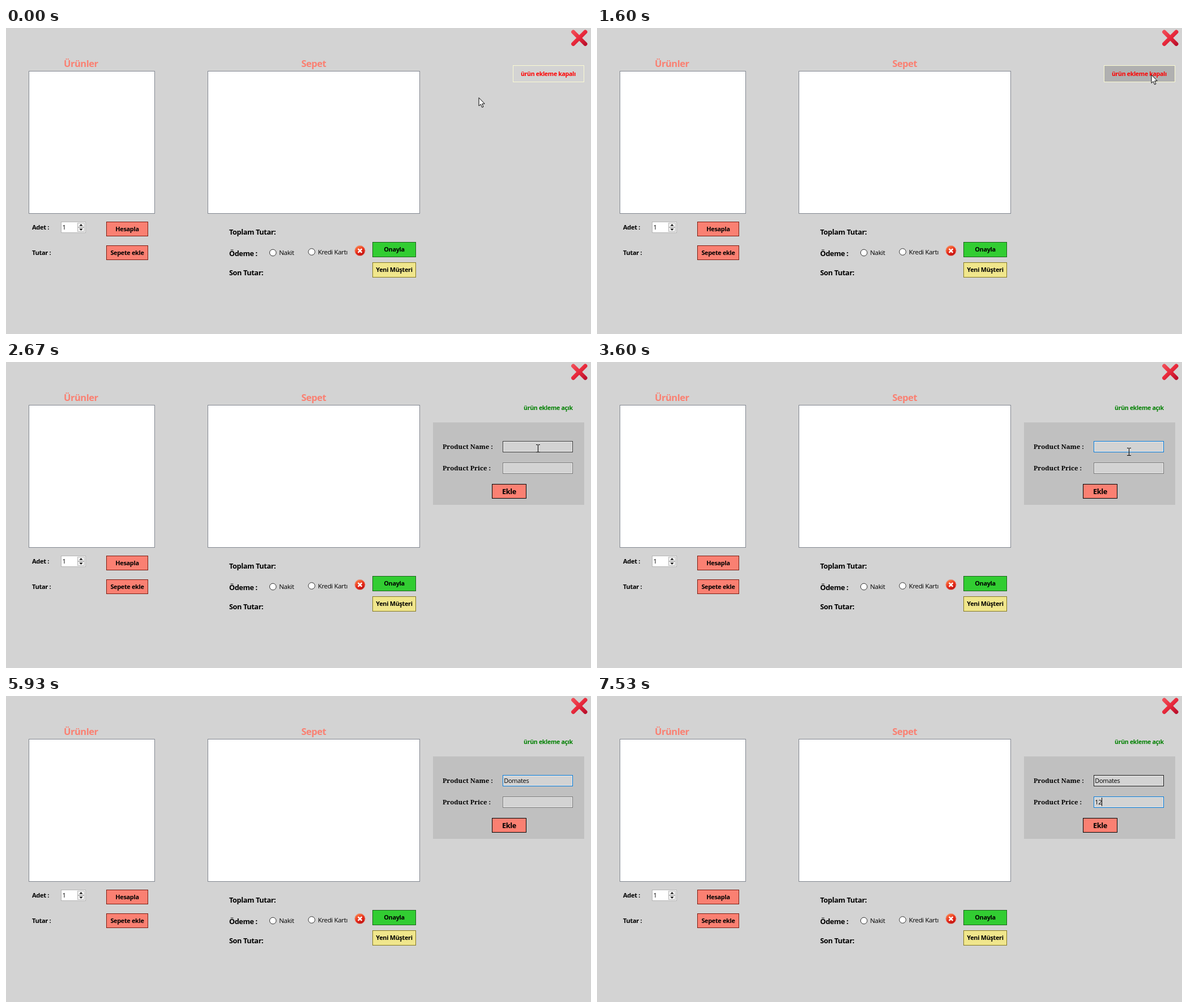
These frames come from a looping animation (1033 px wide and 542 px high, 8000 ms). An HTML page with a canvas:

```html
<!DOCTYPE html>
<html lang="tr">
<head>
<meta charset="utf-8">
<title>Sepet</title>
<style>
  html, body { margin: 0; width: 100%; height: 100%; overflow: hidden; background: #d3d3d3; }
  canvas { display: block; }
</style>
</head>
<body>
<canvas id="stage" width="1033" height="542"></canvas>
<script>
const ctx = document.getElementById('stage').getContext('2d');
const LOOP = 8000;
const TICK = 200 / 3;
const SANS = '"Open Sans", "Noto Sans", sans-serif';
const SERIF = '"Noto Serif", serif';
const SALMON = '#fa8072';
const clamp = v => Math.max(0, Math.min(1, v));
const smooth = v => v * v * (3 - 2 * v);
const mix = (a, b, u) => a + (b - a) * u;

function setFont(size, weight, family = SANS) {
  ctx.font = `${weight} ${size}px ${family}`;
  ctx.letterSpacing = family === SANS ? `${-0.03 * size}px` : '0px';
}

function text(str, x, y, size, { weight = 700, color = '#000', align = 'left', family = SANS } = {}) {
  setFont(size, weight, family);
  ctx.textAlign = align;
  ctx.fillStyle = color;
  ctx.fillText(str, x, y);
}

function box(x, y, w, h, fill, stroke) {
  ctx.fillStyle = fill;
  ctx.fillRect(x, y, w, h);
  ctx.strokeStyle = stroke;
  ctx.lineWidth = 1;
  ctx.strokeRect(x + 0.5, y + 0.5, w - 1, h - 1);
}

function button(label, x, y, w, h, fill, stroke, size = 10.9) {
  box(x, y, w, h, fill, stroke);
  text(label, x + w / 2, y + h / 2 + size * 0.36, size, { align: 'center' });
}

function shape(points, fill, stroke) {
  ctx.beginPath();
  points.forEach(([x, y]) => ctx.lineTo(x, y));
  ctx.closePath();
  ctx.fillStyle = fill;
  ctx.fill();
  if (stroke) {
    ctx.strokeStyle = stroke;
    ctx.lineWidth = 1;
    ctx.stroke();
  }
}

function cross(x, y, r, width, color) {
  ctx.strokeStyle = color;
  ctx.lineWidth = width;
  ctx.beginPath();
  ctx.moveTo(x - r, y - r);
  ctx.lineTo(x + r, y + r);
  ctx.moveTo(x + r, y - r);
  ctx.lineTo(x - r, y + r);
  ctx.stroke();
}

function gradient(x0, y0, x1, y1, ...colors) {
  const g = ctx.createLinearGradient(x0, y0, x1, y1);
  colors.forEach((c, i) => g.addColorStop(i / (colors.length - 1), c));
  return g;
}

function disc(x, y, r, fill, stroke) {
  ctx.beginPath();
  ctx.arc(x, y, r, 0, 7);
  ctx.fillStyle = fill;
  ctx.fill();
  ctx.strokeStyle = stroke;
  ctx.lineWidth = 1;
  ctx.stroke();
}

function radio(label, x, y) {
  disc(x, y, 5.8, '#fff', '#333');
  text(label, x + 11, y + 4.3, 11.5, { weight: 400 });
}

function spinner() {
  box(97, 343, 44, 20, '#fff', '#b4b4b4');
  text('1', 99.5, 357, 11.2, { weight: 400 });
  for (const [y, dir] of [[345, -1], [353.5, 1]]) {
    box(126, Math.floor(y), 13, 8, '#f0f0f0', '#b8b8b8');
    const c = Math.floor(y) + 4;
    shape([[129.5, c - dir * 1.5], [135.5, c - dir * 1.5], [132.5, c + dir * 1.8]], '#000');
  }
}

function drawForm() {
  ctx.fillStyle = '#d3d3d3';
  ctx.fillRect(0, 0, 1033, 542);

  ctx.lineCap = 'round';
  cross(1012.3, 17.6, 10.6, 7.2, gradient(1000, 4, 1024, 30, '#f0505a', '#e92a3c', '#b90f2b'));
  ctx.lineCap = 'butt';

  text('Ürünler', 102, 69, 16.5, { color: SALMON });
  text('Sepet', 521.5, 69, 16.5, { color: SALMON });
  box(40, 76, 223, 253, '#fff', '#828790');
  box(356, 76, 375, 253, '#fff', '#828790');

  text('Adet :', 46, 356.5, 11.1);
  text('Tutar :', 46, 402, 11.1);
  spinner();
  button('Hesapla', 177, 343, 74, 26, SALMON, '#7c1c12');
  button('Sepete ekle', 177, 385, 74, 26, SALMON, '#7c1c12');

  text('Toplam Tutar:', 394, 365.5, 12.7);
  text('Ödeme :', 394, 403.5, 12.7);
  text('Son Tutar:', 394, 437.5, 12.7);
  radio('Nakit', 471.3, 398);
  radio('Kredi Kartı', 539.7, 396.5);

  disc(625, 394.5, 9.2, gradient(620, 385, 630, 404, '#ff8a4a', '#e8301c', '#b80c10'), '#e2a49a');
  cross(625, 394.5, 3.3, 2.6, '#fff');

  button('Onayla', 647, 379, 77, 27, '#32cd32', '#1a661a');
  button('Yeni Müşteri', 647, 415, 77, 27, '#f0e68c', '#857a24');
}

function field(y, value, border, caret) {
  box(877, y, 124, 20, '#d3d3d3', border);
  ctx.strokeStyle = '#e9e9e9';
  ctx.strokeRect(878.5, y + 1.5, 121, 17);
  text(value, 879.3, y + 14, 11, { weight: 400 });
  if (caret) {
    const x = Math.round(878.6 + ctx.measureText(value).width);
    ctx.fillStyle = '#000';
    ctx.fillRect(x, y + 2, 1, 15);
  }
}

const typed = (word, times, t) => word.slice(0, times.filter(at => t >= at).length);
const NAME_KEYS = [4270, 4530, 4730, 4870, 5070, 5200, 5400];
const PRICE_KEYS = [7330, 7530];
const between = (t, a, b) => t >= a && t < b;

// Borders fade from one state to another, as native text boxes do.
function grayTo(from, to, u) {
  return `rgb(${from.map((c, i) => Math.round(mix(c, to[i], clamp(u)))).join()})`;
}
const IDLE = [122, 122, 122], HOVER = [23, 23, 23], FOCUS = [0, 120, 215];

function drawPanel(t) {
  ctx.fillStyle = '#c0c0c0';
  ctx.fillRect(754, 107, 267, 146);
  text('Product Name :', 771, 154, 11.4, { family: SERIF });
  text('Product Price :', 771, 192, 11.4, { family: SERIF });

  const nameBorder =
    t < 3000 ? grayTo(IDLE, HOVER, (t - 2530) / 220) :
    t < 6930 ? grayTo(HOVER, FOCUS, (t - 2950) / 100) :
    grayTo(FOCUS, HOVER, (t - 6900) / 250);
  const nameCaret = between(t, 3070, 3600) || between(t, 4130, 5930) || between(t, 6470, 6930);
  field(140, typed('Domates', NAME_KEYS, t), nameBorder, nameCaret);
  field(178, typed('12', PRICE_KEYS, t), grayTo(IDLE, FOCUS, (t - 6900) / 250), t >= 6930);
  button('Ekle', 858, 216, 61, 26, SALMON, '#000', 12.7);
}

function drawToggle(t, [x, y]) {
  const open = t >= 1730;
  const hover = between(x, 895, 1021) && between(y, 66, 96);
  const fill = !hover ? '#d3d3d3' : between(t, 1600, 1730) ? '#b0b0b0' : '#bebebe';
  box(895, 66, 126, 30, fill, open ? fill : '#fafad2');
  text(open ? 'ürün ekleme açık' : 'ürün ekleme kapalı', 957.4, 85, 10.6,
    { color: open ? '#008000' : '#f00', align: 'center' });
}

function pointerAt(t) {
  const now = Math.floor((t + 5) / TICK) * TICK;
  if (t < 1700) {
    const u = smooth(clamp((now - 200) / 466));
    return [mix(834.5, 978.5, u), mix(123, 82.5, u)];
  }
  const u = smooth(clamp((now - 2066) / 600));
  const drop = smooth(clamp((now - 2667) / 266));
  return [mix(978.5, 940, u), mix(82.5, 153, u) + 6 * drop];
}

function drawPointer(t, [x, y]) {
  const overField = t > 1730 && between(x, 877, 1001) && between(y, 140, 160);
  if (!overField) {
    const outline = [[0, 0], [0, 14.5], [3.3, 11.6], [5.6, 17], [8, 16], [5.7, 10.8], [10.2, 10.6]];
    shape(outline.map(([px, py]) => [x + px + 0.5, y + py + 0.5]), '#fff', '#000');
    return;
  }
  if (t >= 4270) return;
  const left = Math.round(x) - 1, top = Math.round(y) - 6;
  ctx.fillStyle = '#000';
  ctx.fillRect(left, top, 1, 13);
  for (const edge of [top - 1, top + 12]) {
    ctx.fillRect(left - 3, edge, 3, 1);
    ctx.fillRect(left + 1, edge, 3, 1);
  }
}

function draw(t) {
  const pointer = pointerAt(t);
  drawForm();
  drawToggle(t, pointer);
  if (t >= 1730) drawPanel(t);
  drawPointer(t, pointer);
}

const start = performance.now();
function tick() {
  draw((performance.now() - start) % LOOP);
  requestAnimationFrame(tick);
}
tick();
</script>
</body>
</html>
```
